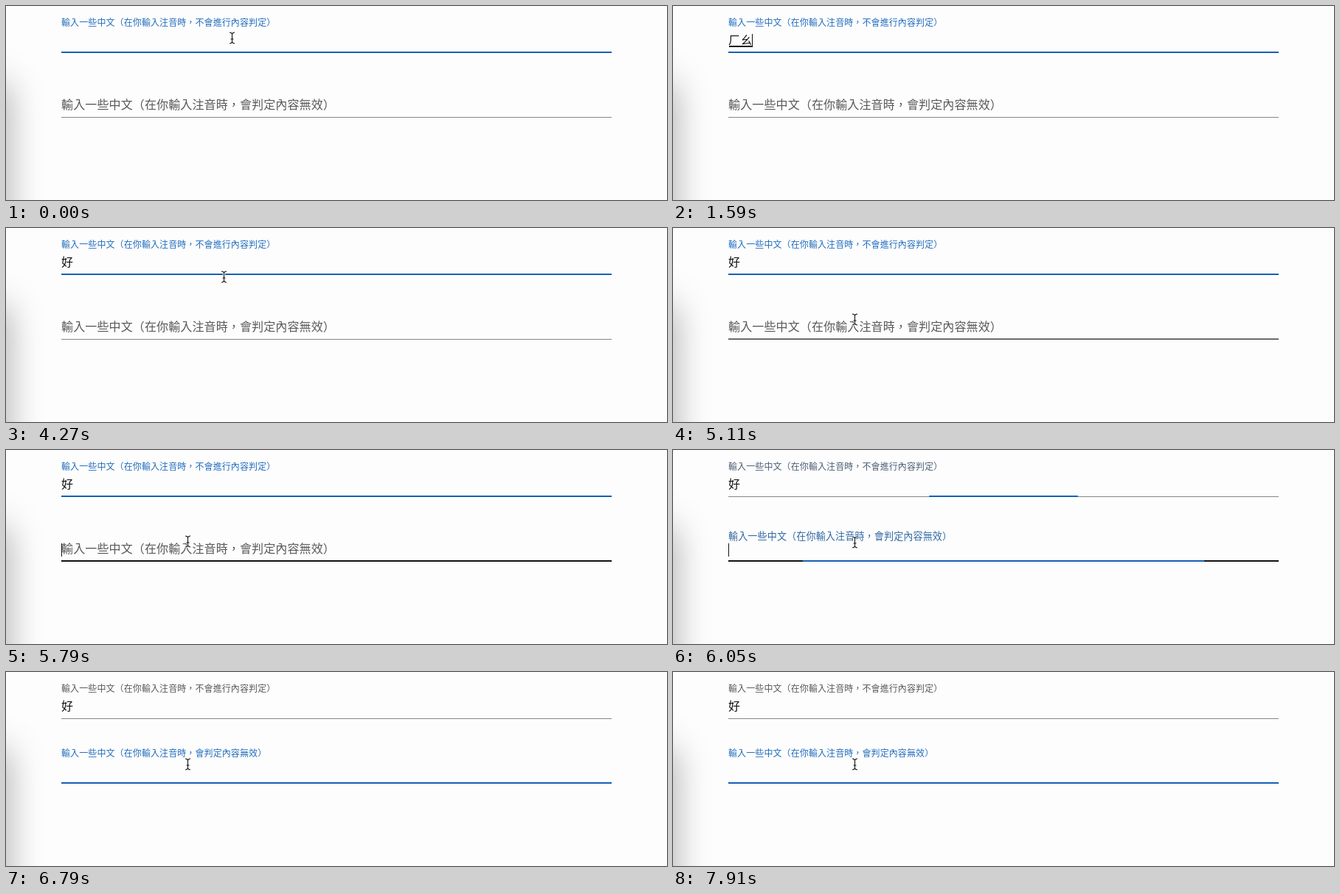
An HTML page that plays this animation: 896 by 264 pixels, repeating every 8 s.

```html
<!DOCTYPE html>
<html lang="zh-Hant">
<head>
<meta charset="utf-8">
<style>
  html, body { margin: 0; width: 100%; height: 100%; overflow: hidden; background: #fdfdfd; }
  #shade {
    position: absolute; left: -300px; top: 95px; width: 300px; height: 400px;
    box-shadow: 0 24px 38px 3px rgba(0, 0, 0, .16), 0 9px 46px 8px rgba(0, 0, 0, .14);
  }
  svg { position: absolute; left: 0; top: 0; display: block; }
  text {
    font: 16px "Noto Sans CJK TC", "Noto Sans CJK", "Noto Sans CJK JP", sans-serif;
    letter-spacing: .13px;
  }
  #value, .ink { fill: #111; }
  .thin { fill: #868686; }
  .blue { fill: #1560b4; }
  #pointer path { fill: none; stroke: #fff; stroke-width: 3; }
  #pointer path + path { stroke: #111; stroke-width: 1.1; }
</style>
</head>
<body>
<div id="shade"></div>
<svg width="896" height="264" viewBox="0 0 896 264">
  <text id="label1" transform="translate(75 27) scale(.75)">輸入一些中文（在你輸入注音時，不會進行內容判定）</text>
  <text id="value" x="75" y="52"></text>
  <rect id="mark" class="ink" x="76" y="54" height="2"/>
  <rect class="thin" x="75" y="63" width="746" height="1"/>
  <rect id="line1" class="blue" y="62" height="2"/>

  <text id="label2">輸入一些中文（在你輸入注音時，會判定內容無效）</text>
  <rect class="thin" x="75" y="151" width="746" height="1"/>
  <rect id="hover" class="ink" x="75" y="150" width="746" height="2"/>
  <rect id="line2" class="blue" y="150" height="2"/>

  <rect id="caret" class="ink" width="1" height="18"/>
  <g id="pointer">
    <path d="M-3.5-7.5Q-.7-7.5 0-5.5Q.7-7.5 3.5-7.5M0-5.5V5.5M-3.5 7.5Q-.7 7.5 0 5.5Q.7 7.5 3.5 7.5M-2 1.5H2"/>
    <path d="M-3.5-7.5Q-.7-7.5 0-5.5Q.7-7.5 3.5-7.5M0-5.5V5.5M-3.5 7.5Q-.7 7.5 0 5.5Q.7 7.5 3.5 7.5M-2 1.5H2"/>
  </g>
</svg>
<script>
const LOOP = 8000, SWITCH = 5770, FLOAT = 5946;
const BLUE = [32, 108, 190], GREY = [88, 88, 90];
const typed = [[0, ''], [1010, 'ㄏ'], [1330, 'ㄏㄠ'], [1850, '好']];
const caretOn = [[250, 750], [1010, 2810], [3310, 3810], [4310, 4810], [5310, 6490], [6990, 7490]];
const path = [[3950, 306, 43], [4270, 295, 66], [5050, 246, 124], [5850, 246, 124], [5950, 246, 125]];

const $ = id => document.getElementById(id);
const set = (id, attrs) => {
  for (const k in attrs) $(id).setAttribute(k, attrs[k]);
};
const show = (id, on) => set(id, { visibility: on ? 'visible' : 'hidden' });
const clamp = v => Math.min(1, Math.max(0, v));
const mix = (a, b, p) => a + (b - a) * p;
const tint = (a, b, p) => `rgb(${a.map((v, i) => Math.round(mix(v, b[i], p)))})`;

// cubic-bezier(.25, .8, .25, 1)
function ease(x) {
  if (x <= 0 || x >= 1) return clamp(x);
  let lo = 0, hi = 1, s;
  for (let i = 0; i < 24; i++) {
    s = (lo + hi) / 2;
    if (.75 * s * (1 - s) + s ** 3 < x) lo = s; else hi = s;
  }
  return 2.4 * s * (1 - s) ** 2 + 3 * s * s * (1 - s) + s ** 3;
}

function pointerAt(t) {
  const i = path.findIndex(p => p[0] > t);
  if (i < 0) return path[path.length - 1].slice(1);
  if (i === 0) return path[0].slice(1);
  const a = path[i - 1], b = path[i], p = (t - a[0]) / (b[0] - a[0]);
  return [mix(a[1], b[1], p), mix(a[2], b[2], p)];
}

const ripple = (id, p) => set(id, { x: 448 - 373 * p, width: 746 * p });

function draw(t) {
  const p = ease((t - FLOAT) / 400);
  const text = typed.filter(k => k[0] <= t).pop()[1];
  const second = t >= SWITCH;

  $('value').textContent = text;
  set('mark', { width: 16 * text.length });
  show('mark', t < 2310);

  set('label1', { fill: tint(BLUE, GREY, p) });
  set('label2', {
    fill: tint(GREY, BLUE, p),
    transform: `translate(75 ${mix(140, 115, p)}) scale(${mix(1, .75, p)})`
  });
  ripple('line1', 1 - p);
  ripple('line2', p);
  set('hover', { opacity: ease((t - 5020) / 600) });

  set('caret', { x: second ? 75 : 75 + 16 * text.length, y: second ? 127 : 38 });
  show('caret', caretOn.some(([a, b]) => t >= a && t < b));

  set('pointer', { transform: `translate(${pointerAt(t).map(v => Math.round(v) + .5)})` });
  show('pointer', t < 1010 || t >= path[0][0]);
}

const start = performance.now();
function tick() {
  draw((performance.now() - start) % LOOP);
  requestAnimationFrame(tick);
}
tick();
</script>
</body>
</html>
```
